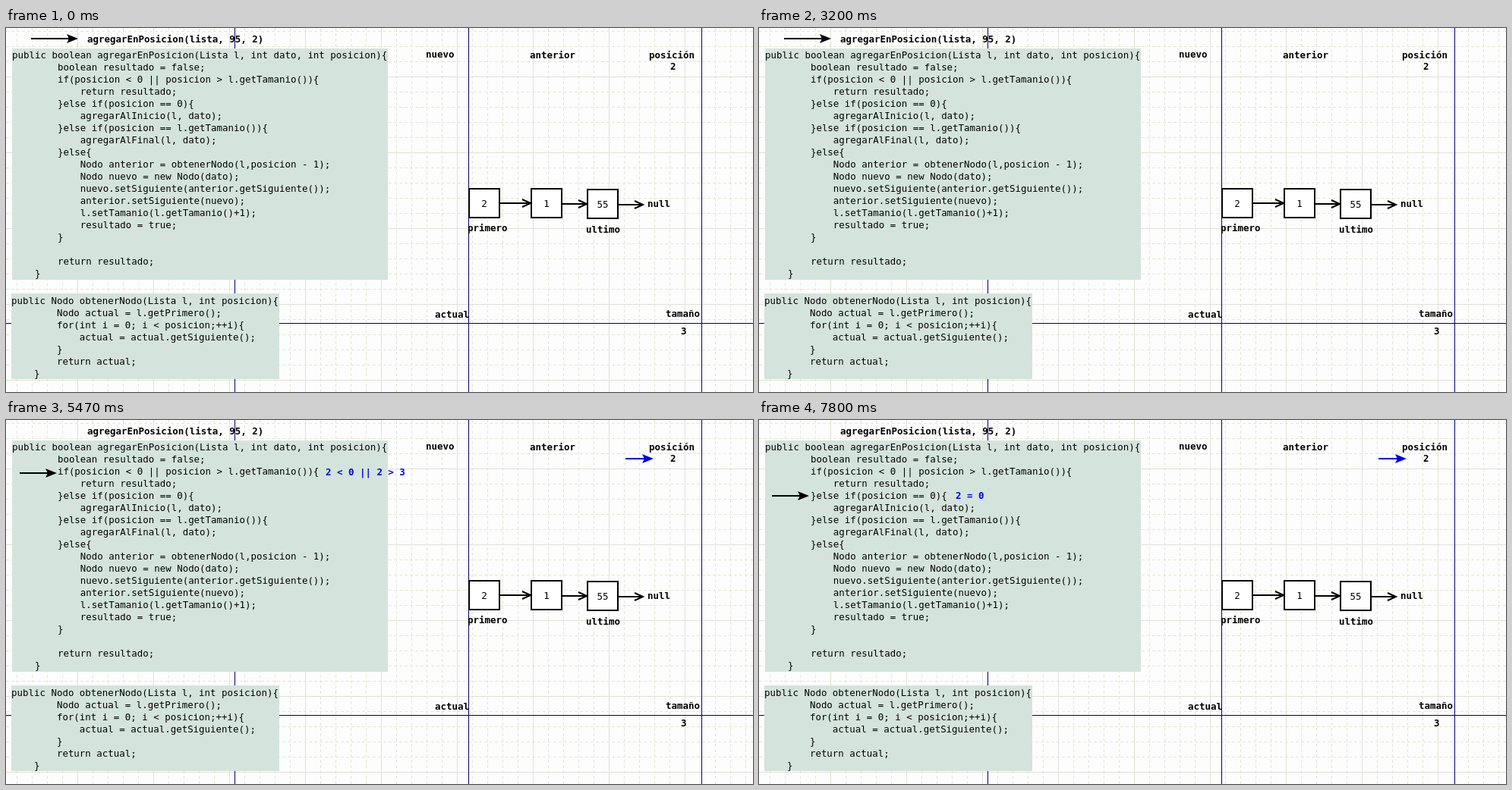
These frames come from a looping animation (984x480 px, 8 s). An HTML page with a canvas:

```html
<!DOCTYPE html>
<html lang="es">
<head>
<meta charset="utf-8">
<style>
html, body { margin: 0; width: 100%; height: 100%; overflow: hidden; background: #fdfdfd; }
canvas { display: block; }
</style>
</head>
<body>
<canvas id="stage" width="984" height="480"></canvas>
<script>
const ctx = document.getElementById('stage').getContext('2d');
const WIDTH = 984, HEIGHT = 480, LOOP = 8000;
const PAPER = '#fdfdfd', INK = '#000', BLUE = '#0000e6', PANEL = '#d4e4dc', AXIS = '#000070';
const FIRST_CHECK = 3300, SECOND_CHECK = 7470;

const insertCode = `public boolean agregarEnPosicion(Lista l, int dato, int posicion){
        boolean resultado = false;
        if(posicion < 0 || posicion > l.getTamanio()){
            return resultado;
        }else if(posicion == 0){
            agregarAlInicio(l, dato);
        }else if(posicion == l.getTamanio()){
            agregarAlFinal(l, dato);
        }else{
            Nodo anterior = obtenerNodo(l,posicion - 1);
            Nodo nuevo = new Nodo(dato);
            nuevo.setSiguiente(anterior.getSiguiente());
            anterior.setSiguiente(nuevo);
            l.setTamanio(l.getTamanio()+1);
            resultado = true;
        }

        return resultado;
    }`;

const findCode = `public Nodo obtenerNodo(Lista l, int posicion){
        Nodo actual = l.getPrimero();
        for(int i = 0; i < posicion;++i){
            actual = actual.getSiguiente();
        }
        return actual;
    }`;

const labels = [
  ['agregarEnPosicion(lista, 95, 2)', 107, 19],
  ['nuevo', 553, 39], ['anterior', 690, 40],
  ['posición', 847, 40], ['2', 875, 55],
  ['primero', 608, 268], ['ultimo', 764, 270], ['null', 845, 236],
  ['actual', 565, 382], ['tamaño', 869, 381], ['3', 889, 404]
];

function text(str, x, y, color = INK, weight = 'normal') {
  ctx.font = `${weight} 12.458px "DejaVu Sans Mono", monospace`;
  ctx.fillStyle = color;
  ctx.fillText(str, x, y);
}

function line(points, color = INK, width = 2) {
  ctx.strokeStyle = color;
  ctx.lineWidth = width;
  ctx.beginPath();
  points.forEach(([x, y]) => ctx.lineTo(x, y));
  ctx.stroke();
}

function grid() {
  const rule = (at, major, points) => {
    const solid = at % 100 === major;
    ctx.setLineDash(solid ? [] : [4, 3]);
    line(points, solid ? '#e0e2d4' : '#e4e6d6', 1);
  };
  for (let x = 14; x < WIDTH; x += 20) rule(x, 94, [[x + .5, 0], [x + .5, HEIGHT]]);
  for (let y = 4; y < HEIGHT; y += 20) rule(y, 64, [[0, y + .5], [WIDTH, y + .5]]);
  ctx.setLineDash([]);
  for (const x of [301.5, 609.5, 916.5]) line([[x, 0], [x, HEIGHT]], AXIS, 1);
  line([[0, 389.5], [WIDTH, 389.5]], AXIS, 1);
}

function codePanel(code, x, y, w, h, baseline) {
  ctx.fillStyle = PANEL;
  ctx.fillRect(x, y, w, h);
  code.split('\n').forEach((row, i) => text(row, x, baseline + 16 * i));
}

function node(value, x, y, w, h) {
  ctx.fillStyle = '#fff';
  ctx.fillRect(x, y, w, h);
  ctx.strokeStyle = INK;
  ctx.lineWidth = 2;
  ctx.strokeRect(x, y, w, h);
  text(value, x + w / 2 - 3.75 * value.length, y + 24);
}

function link(x1, x2, y) {
  line([[x1, y], [x2, y]]);
  line([[x2 - 11, y - 5], [x2, y], [x2 - 11, y + 5]]);
}

function pointer(x1, x2, y, color = INK) {
  line([[x1, y], [x2 - 10, y]], color);
  ctx.fillStyle = color;
  ctx.beginPath();
  ctx.moveTo(x2, y);
  ctx.lineTo(x2 - 15, y - 6);
  ctx.lineTo(x2 - 12, y);
  ctx.lineTo(x2 - 15, y + 6);
  ctx.fill();
}

function draw(time) {
  ctx.fillStyle = PAPER;
  ctx.fillRect(0, 0, WIDTH, HEIGHT);
  grid();
  codePanel(insertCode, 8, 27, 495, 305, 40);
  codePanel(findCode, 7, 350, 353, 113, 364);

  node('2', 610, 212, 40, 38);
  node('1', 692, 212, 40, 38);
  node('55', 766, 213, 40, 38);
  link(651, 691, 231);
  link(733, 765, 232);
  link(807, 839, 233);
  labels.forEach(([str, x, y]) => text(str, x, y, INK, 'bold'));

  if (time < FIRST_CHECK) {
    pointer(33, 95, 14);
    return;
  }
  pointer(816, 853, 51, BLUE);
  if (time < SECOND_CHECK) {
    pointer(18, 67, 70);
    text('2 < 0 || 2 > 3', 421, 73, BLUE, 'bold');
  } else {
    pointer(17, 66, 100);
    text('2 = 0', 259, 104, BLUE, 'bold');
  }
}

function tick() {
  draw(performance.now() % LOOP);
  requestAnimationFrame(tick);
}
tick();
</script>
</body>
</html>
```
